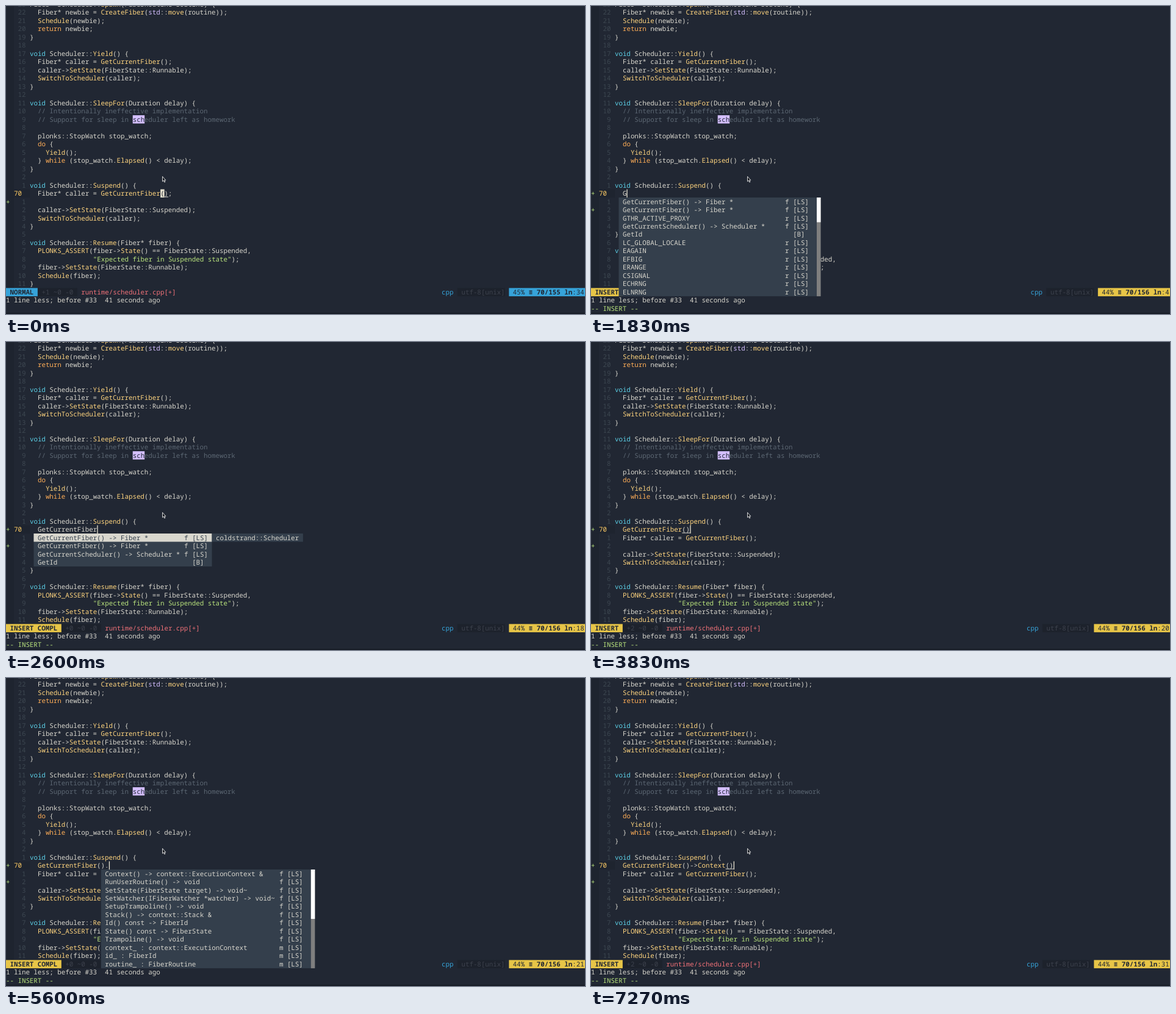
An HTML page that plays this animation: 949 px wide and 505 px high, repeating every 8000 ms.

```html
<!DOCTYPE html>
<html lang="en">
<head>
<meta charset="utf-8">
<style>
html, body { margin: 0; width: 100%; height: 100%; overflow: hidden; background: #212733; }
svg { display: block; width: 949px; height: 505px; }
text {
  font: 10.818px "Noto Sans Mono", "DejaVu Sans Mono", monospace;
  white-space: pre;
  text-rendering: geometricPrecision;
  font-variant-ligatures: none;
}
.b { font-weight: 700; }
</style>
</head>
<body>
<svg id="stage" viewBox="0 0 949 505" xmlns="http://www.w3.org/2000/svg"></svg>
<script>
const CELL = 6.491, LINE = 13.49, TOP = 3.75, COLS = 146, LOOP = 8000;
const CURSOR_ROW = 22, STATUS_ROW = 34;
const C = {
  bg: '#212733', gutter: '#1e242f', fg: '#d9d7ce', num: '#3d4751', accent: '#ffcc66',
  comment: '#5c6773', string: '#bbe67e', type: '#5ccfe6', keyword: '#ffae57',
  func: '#ffd57f', constant: '#d4bfff', red: '#f07178', menu: '#343f4c',
  blue: '#36a3d9', yellow: '#e7c547', panel: '#1d222c', dim: '#3d424d', cursor: '#e6e1cf'
};

// The first line is mostly cut off by the top edge.
const before = `Fiber* Scheduler::Spawn(FiberRoutine routine) {
  Fiber* newbie = CreateFiber(std::move(routine));
  Schedule(newbie);
  return newbie;
}

void Scheduler::Yield() {
  Fiber* caller = GetCurrentFiber();
  caller->SetState(FiberState::Runnable);
  SwitchToScheduler(caller);
}

void Scheduler::SleepFor(Duration delay) {
  // Intentionally ineffective implementation
  // Support for sleep in scheduler left as homework

  plonks::StopWatch stop_watch;
  do {
    Yield();
  } while (stop_watch.Elapsed() < delay);
}

void Scheduler::Suspend() {`.split('\n');

const after = `  Fiber* caller = GetCurrentFiber();

  caller->SetState(FiberState::Suspended);
  SwitchToScheduler(caller);
}

void Scheduler::Resume(Fiber* fiber) {
  PLONKS_ASSERT(fiber->State() == FiberState::Suspended,
                "Expected fiber in Suspended state");
  fiber->SetState(FiberState::Runnable);
  Schedule(fiber);
}`.split('\n');

// Menu entries: label|kind, where the kind may be empty.
const getItems = `GetCurrentFiber() -> Fiber *|f
GetCurrentFiber() -> Fiber *|f
GetCurrentScheduler() -> Scheduler *|f
GetId|`.split('\n');

const allItems = `GetCurrentFiber() -> Fiber *|f
GetCurrentFiber() -> Fiber *|f
GTHR_ACTIVE_PROXY|r
GetCurrentScheduler() -> Scheduler *|f
GetId|
LC_GLOBAL_LOCALE|r
EAGAIN|r
EFBIG|r
ERANGE|r
CSIGNAL|r
ECHRNG|r
ELNRNG|r`.split('\n');

const memberItems = `Context() -> context::ExecutionContext &|f
RunUserRoutine() -> void|f
SetState(FiberState target) -> void~|f
SetWatcher(IFiberWatcher *watcher) -> void~|f
SetupTrampoline() -> void|f
Stack() -> context::Stack &|f
Id() const -> FiberId|f
State() const -> FiberState|f
Trampoline() -> void|f
context_ : context::ExecutionContext|m
id_ : FiberId|m
routine_ : FiberRoutine|m`.split('\n');

const menus = {
  all: { items: allItems, col: 7, kind: 49, end: 58, thumb: 3 },
  get: { items: getItems, col: 7, kind: 45, end: 52 },
  picked: { items: getItems, col: 7, kind: 45, end: 52, selected: true, note: 'coldstrand::Scheduler' },
  members: { items: memberItems, col: 24, kind: 69, end: 78, thumb: 6 },
  context: { items: memberItems.slice(0, 1), col: 24, kind: 66, end: 73 },
  contextPicked: { items: memberItems.slice(0, 1), col: 24, kind: 66, end: 73, selected: true }
};

// Each step starts at a time and holds until the next one.
const call = 'GetCurrentFiber()';
const steps = [
  { at: 0, mode: 'NORMAL', hunk: 1 },
  { at: 670, mode: 'INSERT', hunk: 1, typed: '' },
  { at: 1300, mode: 'INSERT', hunk: 2, typed: '' },
  { at: 1730, mode: 'INSERT', hunk: 2, typed: 'G' },
  { at: 1800, mode: 'INSERT', hunk: 2, typed: 'G', menu: 'all' },
  { at: 1900, mode: 'INSERT COMPL', hunk: 0, typed: 'Ge', menu: 'get' },
  { at: 2000, mode: 'INSERT COMPL', hunk: 0, typed: 'Get', menu: 'get' },
  { at: 2600, mode: 'INSERT COMPL', hunk: 0, typed: 'GetCurrentFiber', menu: 'picked' },
  { at: 3830, mode: 'INSERT', hunk: 2, typed: call },
  { at: 4470, mode: 'INSERT', hunk: 2, typed: call + '.' },
  { at: 4530, mode: 'INSERT COMPL', hunk: 0, typed: call + '.', menu: 'members' },
  { at: 5870, mode: 'INSERT COMPL', hunk: 0, typed: call + '.C', menu: 'context' },
  { at: 5970, mode: 'INSERT COMPL', hunk: 0, typed: call + '.Co', menu: 'context' },
  { at: 6430, mode: 'INSERT COMPL', hunk: 0, typed: call + '->Context', menu: 'contextPicked' },
  { at: 7270, mode: 'INSERT', hunk: 2, typed: call + '->Context()' }
];

const esc = s => s.replace(/&/g, '&amp;').replace(/</g, '&lt;').replace(/>/g, '&gt;');
const x = col => (col * CELL).toFixed(2);
const y = row => TOP + row * LINE;

function box(col, row, cols, fill, rows = 1) {
  return `<rect x="${x(col)}" y="${y(row).toFixed(2)}" width="${x(cols)}" height="${(rows * LINE).toFixed(2)}" fill="${fill}"/>`;
}

function rawText(col, row, markup, fill, cls = '') {
  return `<text x="${x(col)}" y="${(y(row) + 10.5).toFixed(2)}" fill="${fill}" class="${cls}">${markup}</text>`;
}

const put = (col, row, s, fill, cls) => rawText(col, row, esc(s), fill, cls);

function tokenColor(s) {
  if (s.startsWith('//')) return C.comment;
  if (s[0] === '"') return C.string;
  if (s === 'void') return C.type;
  if (s === 'std') return C.constant;
  if (/^(return|do|while)$/.test(s)) return C.keyword;
  return C.func;
}

function code(row, line) {
  const indent = line.search(/\S/);
  if (indent < 0) return '';
  const token = /(\/\/.*|"[^"]*"|\b(?:void|std|return|do|while)\b|\w+(?=\())/;
  const markup = line.trim().split(token).map((part, i) =>
    i % 2 ? `<tspan fill="${tokenColor(part)}">${esc(part)}</tspan>` : esc(part)).join('');
  return rawText(6 + indent, row, markup, C.fg);
}

function underline(col, row, cols) {
  return `<rect x="${x(col)}" y="${(y(row) + 12).toFixed(2)}" width="${x(cols)}" height="1" fill="${C.fg}"/>`;
}

function editor(step) {
  const inserting = step.typed !== undefined;
  const lines = inserting ? [...before, '  ' + step.typed, ...after] : [...before, ...after];
  let out = `<rect width="${x(2)}" height="${y(STATUS_ROW)}" fill="${C.gutter}"/>` +
    box(0, CURSOR_ROW, 6, C.gutter);
  lines.slice(0, STATUS_ROW + 1).forEach((line, i) => {
    const row = i - 1, dist = Math.abs(row - CURSOR_ROW);
    out += dist ? put(dist > 9 ? 3 : 4, row, String(dist), C.num) : put(2, row, '70', C.accent);
    out += code(row, line);
  });
  out += box(32, 13, 3, C.constant) + put(32, 13, 'sch', C.bg);
  out += put(0, CURSOR_ROW + (inserting ? 2 : 1), '+', C.string);
  if (inserting && step.at >= 1300) out += put(0, CURSOR_ROW, '+', C.string);

  if (!inserting) {
    return out + box(39, CURSOR_ROW, 1, C.cursor) + put(39, CURSOR_ROW, '(', C.bg) +
      underline(40, CURSOR_ROW, 1);
  }
  const col = 8 + step.typed.length;
  if (step.typed.endsWith('()')) out += underline(col - 2, CURSOR_ROW, 2);
  return out + box(col, CURSOR_ROW, 0.2, C.cursor);
}

function status(step) {
  const row = STATUS_ROW, normal = step.mode === 'NORMAL';
  const tint = normal ? C.blue : C.yellow;
  const left = step.mode.length + 2;
  const place = ':' + (normal ? 34 : step.typed.length + 3);
  const right = COLS - 15 - place.length;
  return box(0, row, COLS + 1, C.bg) +
    box(0, row, left, tint) + put(1, row, step.mode, C.bg, 'b') +
    box(left, row, 10, C.panel) + put(left + 1, row, `+${step.hunk} ~0 -0`, C.dim) +
    put(left + 11, row, 'runtime/scheduler.cpp[+]', C.red) +
    put(right - 18, row, 'cpp', C.blue) +
    box(right - 14, row, 12, C.panel) + put(right - 13, row, 'utf-8[unix]', C.dim) +
    box(right - 1, row, 21, tint) +
    put(right, row, normal ? '45%' : '44%', C.bg) +
    put(right + 4, row, '≡', C.bg, 'b') +
    put(right + 6, row, normal ? '70/155' : '70/156', C.bg, 'b') +
    put(right + 13, row, 'ln', C.bg, 'b') + put(right + 15, row, place, C.bg) +
    put(0, row + 1, '1 line less; before #33  41 seconds ago', C.fg) +
    (normal ? '' : put(0, row + 2, '-- INSERT --', C.string));
}

function popup(menu) {
  const first = CURSOR_ROW + 1, size = menu.items.length;
  let out = box(menu.col, first, menu.end - menu.col, C.menu, size);
  menu.items.forEach((item, i) => {
    const [label, kind] = item.split('|'), row = first + i;
    const picked = menu.selected && i === 0;
    const ink = picked ? C.menu : C.fg;
    if (picked) out += box(menu.col, row, menu.end - menu.col, C.fg);
    out += put(menu.col + 1, row, label, ink) + put(menu.kind, row, kind, ink) +
      put(menu.kind + 2, row, kind ? '[LS]' : '[B]', ink);
  });
  if (menu.thumb) {
    out += box(menu.end - 1, first, 1, '#7f7f7f', size) + box(menu.end - 1, first, 1, '#fff', menu.thumb);
  }
  if (menu.note) {
    out += box(menu.end, first, menu.note.length + 2, C.menu) + put(menu.end + 1, first, menu.note, C.fg);
  }
  return out;
}

const pointer = '<path d="M256.5 279.5v8.2l1.9-1.6 1.3 2.9 1.2-.6-1.3-2.8h2.2z" fill="#15181e" stroke="#e8e8e8" stroke-width=".9"/>';
const stage = document.getElementById('stage');
let shown;

function render(t) {
  const step = steps.findLast(s => s.at <= t) || steps[0];
  if (step === shown) return;
  shown = step;
  stage.innerHTML = `<rect width="949" height="505" fill="${C.bg}"/>` +
    editor(step) + status(step) + (step.menu ? popup(menus[step.menu]) : '') +
    '<rect y="503" width="949" height="2" fill="#171c26"/>' + pointer;
}

const start = performance.now();
function tick() {
  render((performance.now() - start) % LOOP);
  requestAnimationFrame(tick);
}
tick();
</script>
</body>
</html>
```
